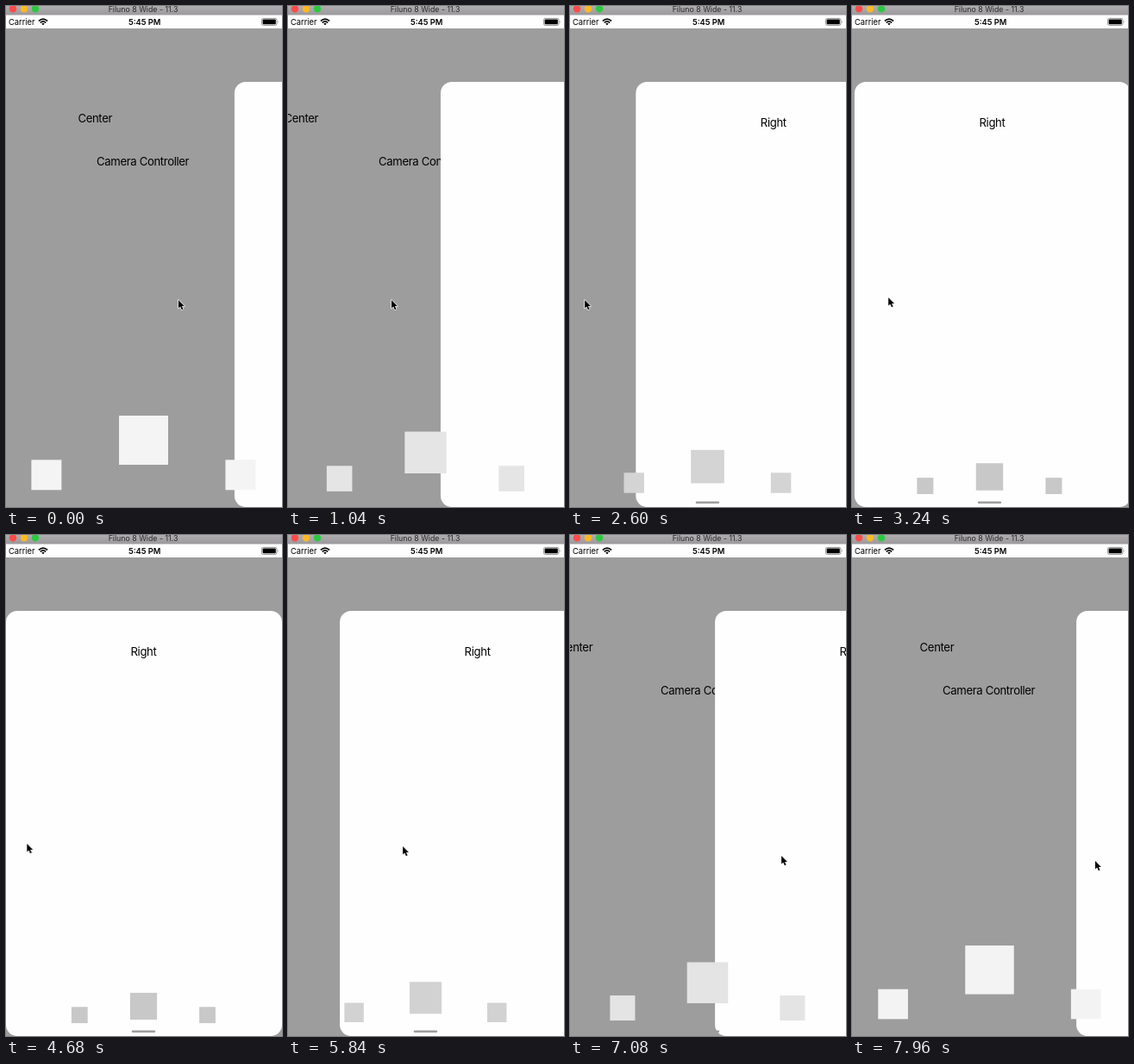
Write an HTML page that moves like this. It is 320 px wide and 581 px high and loops after 8 s.

```html
<!DOCTYPE html>
<html lang="en">
<head>
<meta charset="utf-8">
<title>Sliding panel</title>
<style>
  /* --x: left edge of the sliding panel; everything but the pointer follows it */
  @property --x { syntax: "<number>"; inherits: true; initial-value: 265; }

  html, body { margin: 0; width: 100%; height: 100%; overflow: hidden; background: #9d9d9d; }
  svg { display: block; width: 320px; height: 581px; font-family: Inter, Roboto, sans-serif; }

  .stage {
    --shade: calc(199.5 + .168 * var(--x));
    --spread: calc(74.1 + .145 * var(--x));
    animation: slide 8s linear infinite;
  }
  .panel, .center { transform: translateX(calc(var(--x) * 1px)); }
  .label { font-size: 13.14px; letter-spacing: -.35px; }
  .status { font-size: 9.3px; }

  .square {
    --cx: 159.5;
    --cy: calc(556.7 - .0487 * var(--x));
    --size: calc(18.8 + .061 * var(--x));
    fill: rgb(var(--shade), var(--shade), var(--shade));
    transform: translate(calc(var(--cx) * 1px), calc(var(--cy) * 1px)) scale(var(--size));
  }
  .big { --cy: calc(546.5 - .1622 * var(--x)); --size: calc(31.2 + .0973 * var(--x)); }
  .left { --cx: calc(159.4 - var(--spread)); }
  .right { --cx: calc(159.4 + var(--spread)); }

  .pointer { animation: point 8s linear infinite; }

  @keyframes slide {
    0% { --x: 265; }
    10.5% { --x: 193; }
    13% { --x: 177; }
    21.5% { --x: 140; }
    23.5% { --x: 130; }
    31.5% { --x: 82; }
    34% { --x: 68; animation-timing-function: cubic-bezier(.3, .3, .5, 1); }
    40.5% { --x: 3; }
    43%, 63.5% { --x: 0; }
    73% { --x: 60; }
    84% { --x: 142; }
    88.5% { --x: 168; }
    99.5% { --x: 260; }
    100% { --x: 264; }
  }
  @keyframes point {
    0% { transform: translate(200px, 341px); }
    13% { transform: translate(120px, 341px); }
    23.5% { transform: translate(70px, 341px); }
    31.5% { transform: translate(22px, 341px); }
    34% { transform: translate(10px, 341px); }
    40.5% { transform: translate(42px, 338px); }
    52.5% { transform: translate(210px, 380px); }
    58.5% { transform: translate(24px, 358px); }
    60.5%, 63.5% { transform: translate(72px, 354px); }
    73% { transform: translate(133px, 361px); }
    88.5% { transform: translate(245px, 372px); animation-timing-function: ease-out; }
    99.5%, 100% { transform: translate(282px, 378px); }
  }
</style>
</head>
<body>
<svg class="stage" viewBox="0 0 320 581">
  <defs>
    <linearGradient id="bar" x2="0" y2="1">
      <stop stop-color="#b0adb0"/>
      <stop offset="1" stop-color="#9b989b"/>
    </linearGradient>
  </defs>

  <rect width="320" height="581" fill="#9d9d9d"/>
  <g class="label">
    <text class="center" x="-181.5" y="135">Center</text>
    <text x="105" y="185">Camera Controller</text>
  </g>

  <g class="panel">
    <rect y="88" width="320" height="493" rx="13" fill="#fefefe"/>
    <text class="label" x="144.5" y="139.7">Right</text>
  </g>

  <rect x="145.7" y="574.6" width="27.5" height="2.5" rx="1.25" fill="#9d9d9d"/>
  <rect class="square big" x="-.5" y="-.5" width="1" height="1"/>
  <rect class="square left" x="-.5" y="-.5" width="1" height="1"/>
  <rect class="square right" x="-.5" y="-.5" width="1" height="1"/>

  <g class="status">
    <rect y="10" width="320" height="16" fill="#fefefe"/>
    <text x="3" y="22">Carrier</text>
    <text x="160.7" y="22" text-anchor="middle" font-weight="600">5:45 PM</text>
    <g fill="none" stroke="#000" stroke-width="1.7">
      <path d="M37.9 17.4Q43 12.8 48.1 17.4M39.8 19.4Q43 16.5 46.2 19.4"/>
      <path d="M41.3 20.5Q43 19.2 44.7 20.5L43 22.3Z" fill="#000" stroke="none"/>
    </g>
    <rect x="296.4" y="14.4" width="17.6" height="8" rx="2" fill="none" stroke="#777" stroke-width=".8"/>
    <rect x="297.6" y="15.6" width="15.2" height="5.6" rx="1"/>
    <path d="M315 17v2.8q1.2-1.4 0-2.8" fill="#777"/>
  </g>

  <rect width="320" height="10.5" fill="url(#bar)"/>
  <circle cx="8" cy="3.2" r="4.2" fill="#fc4b48"/>
  <circle cx="21" cy="3.2" r="4.2" fill="#fdb924"/>
  <circle cx="34" cy="3.2" r="4.2" fill="#2bc840"/>
  <text x="159" y="6.8" text-anchor="middle" font-size="8.8" fill="#2b292b">Filuno 8 Wide - 11.3</text>

  <g class="pointer">
    <path d="M0 0V9.6L2.2 7.6 3.8 11.2 5.5 10.4 3.9 7H6.9Z"
          stroke="#fff" stroke-width="1.4" stroke-linejoin="round" paint-order="stroke"/>
  </g>
</svg>
</body>
</html>
```
